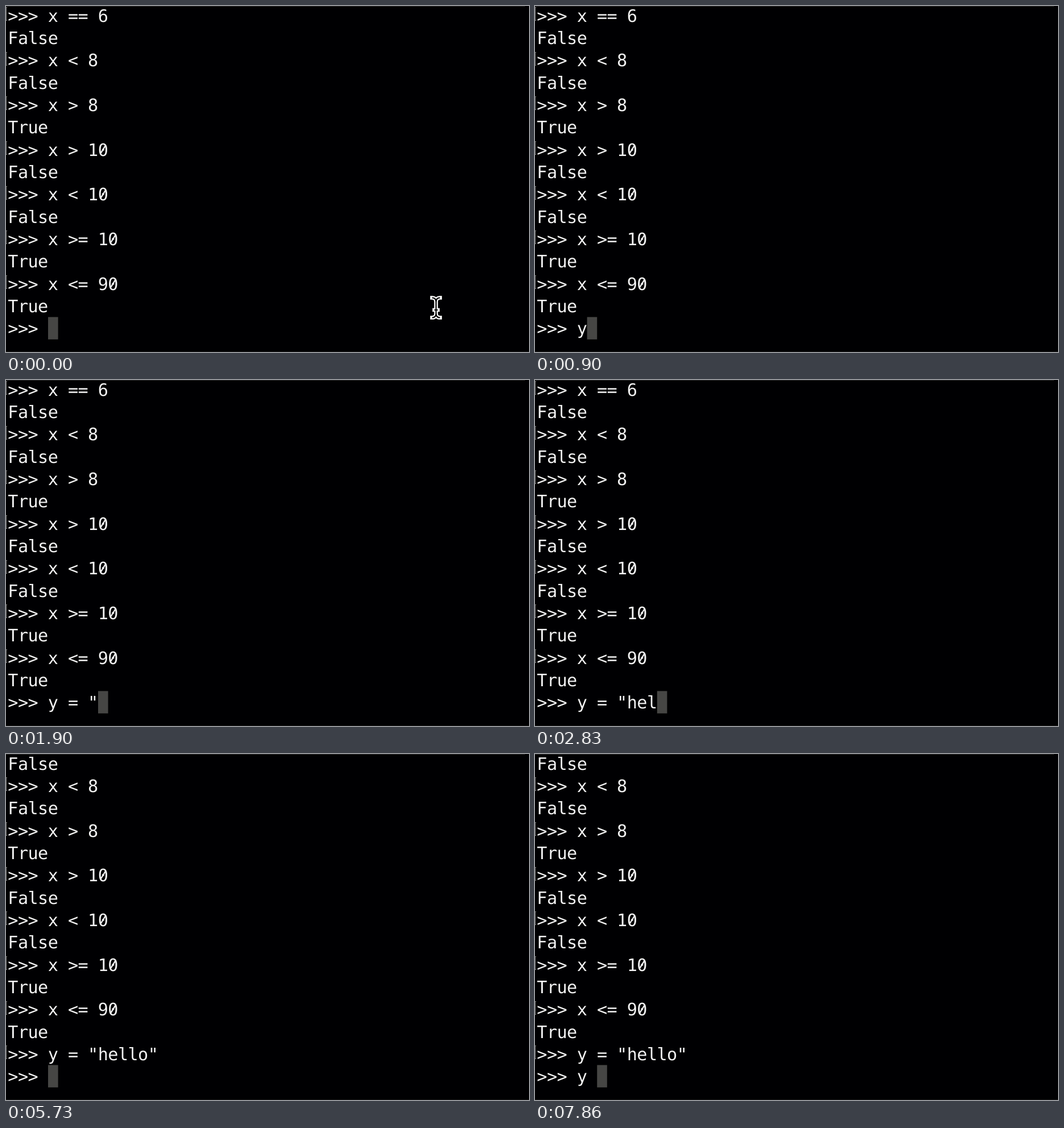
Write an HTML page with a canvas that moves like this. It is 920 by 609 pixels and loops after 8 s.

```html
<!DOCTYPE html>
<html lang="en">
<head>
<meta charset="utf-8">
<title>Terminal session</title>
<style>
  html, body { margin: 0; width: 100%; height: 100%; overflow: hidden; background: #000; }
  canvas { display: block; }
</style>
</head>
<body>
<canvas id="stage" width="920" height="609"></canvas>
<script>
const ctx = document.getElementById('stage').getContext('2d');
const LOOP = 8000;
const COL = 17.6, ROW = 118 / 3, LEFT = 3.6, TOP = -3.2, BASE = 30.7;
const PROMPT = '>>> ';
const INPUT = 'y = "hello"';
const ENTER = 5730;
const KEYS = [900, 1030, 1260, 1430, 1900, 2530, 2630, 2830, 2960, 3160, 4000];
const NEXT_KEYS = [7630, 7860];

const HISTORY = [
  '>>> x == 6', 'False',
  '>>> x < 8', 'False',
  '>>> x > 8', 'True',
  '>>> x > 10', 'False',
  '>>> x < 10', 'False',
  '>>> x >= 10', 'True',
  '>>> x <= 90', 'True'
];

const typed = (keys, t) => INPUT.slice(0, keys.filter(k => t >= k).length);

function zeroSlash(x, base) {
  ctx.beginPath();
  ctx.moveTo(x - 4, base - 4.6);
  ctx.lineTo(x + 4, base - 17.6);
  ctx.stroke();
}

function drawLine(text, row) {
  const base = TOP + BASE + row * ROW;
  ctx.save();
  // A trace of skew keeps baselines from snapping to whole pixels
  ctx.transform(1, 1e-5, 0, 1, 0, 0);
  ctx.font = '30.2px "DejaVu Sans Mono", monospace';
  ctx.textAlign = 'center';
  ctx.textRendering = 'geometricPrecision';
  ctx.fillStyle = ctx.strokeStyle = '#f2f2f2';
  ctx.lineWidth = 2.3;
  [...text].forEach((ch, i) => {
    const x = LEFT + (i + 0.5) * COL;
    ctx.fillText(ch, x, base);
    if (ch === '0') zeroSlash(x, base);
  });
  ctx.restore();
}

// Faint bracket beside each finished prompt
function drawMark(row) {
  const y = Math.round(TOP + row * ROW + 5.2);
  ctx.fillStyle = '#7c7c7c';
  ctx.fillRect(0, y, 1, 24);
  ctx.fillRect(0, y, 2, 1);
  ctx.fillRect(0, y + 23, 2, 1);
}

function drawBlock(col, row) {
  ctx.fillStyle = '#464644';
  ctx.fillRect(LEFT + col * COL, TOP + row * ROW, COL, ROW);
}

function drawPointer(t) {
  if (t >= KEYS[0]) return;
  const step = t < 200 ? 0 : Math.min(6, 1 + Math.floor((t - 200) / 32));
  const p = step / 6, e = p * p * (3 - 2 * p);
  ctx.save();
  ctx.translate(756.5 + 23 * e, 531 + 69 * e);
  const beam = new Path2D();
  for (const side of [-1, 1]) {
    for (const end of [-1, 1]) {
      beam.moveTo(side * 7, end * 17.5);
      beam.quadraticCurveTo(0, end * 17.5, 0, end * 10);
    }
  }
  beam.moveTo(0, -11);
  beam.lineTo(0, 11);
  beam.moveTo(-3, 4);
  beam.lineTo(3, 4);
  ctx.lineCap = 'square';
  ctx.strokeStyle = '#fff';
  ctx.lineWidth = 6.6;
  ctx.stroke(beam);
  ctx.lineCap = 'butt';
  ctx.strokeStyle = '#000';
  ctx.lineWidth = 2.2;
  ctx.stroke(beam);
  ctx.restore();
}

function draw(t) {
  ctx.fillStyle = '#000002';
  ctx.fillRect(0, 0, 920, 609);
  ctx.fillStyle = '#2a2a2a';
  ctx.fillRect(0, 0, 913, 1);
  ctx.fillStyle = '#161616';
  ctx.fillRect(0, 608, 920, 1);

  const entered = t >= ENTER;
  const past = entered ? [...HISTORY.slice(1), PROMPT + INPUT] : HISTORY;
  const current = PROMPT + typed(entered ? NEXT_KEYS : KEYS, t);

  past.forEach((line, row) => {
    if (line.startsWith(PROMPT)) drawMark(row);
    drawLine(line, row);
  });
  drawBlock(current.length, past.length);
  drawLine(current, past.length);
  drawPointer(t);
}

const start = performance.now();
function frame() {
  draw((performance.now() - start) % LOOP);
  requestAnimationFrame(frame);
}
frame();
</script>
</body>
</html>
```
